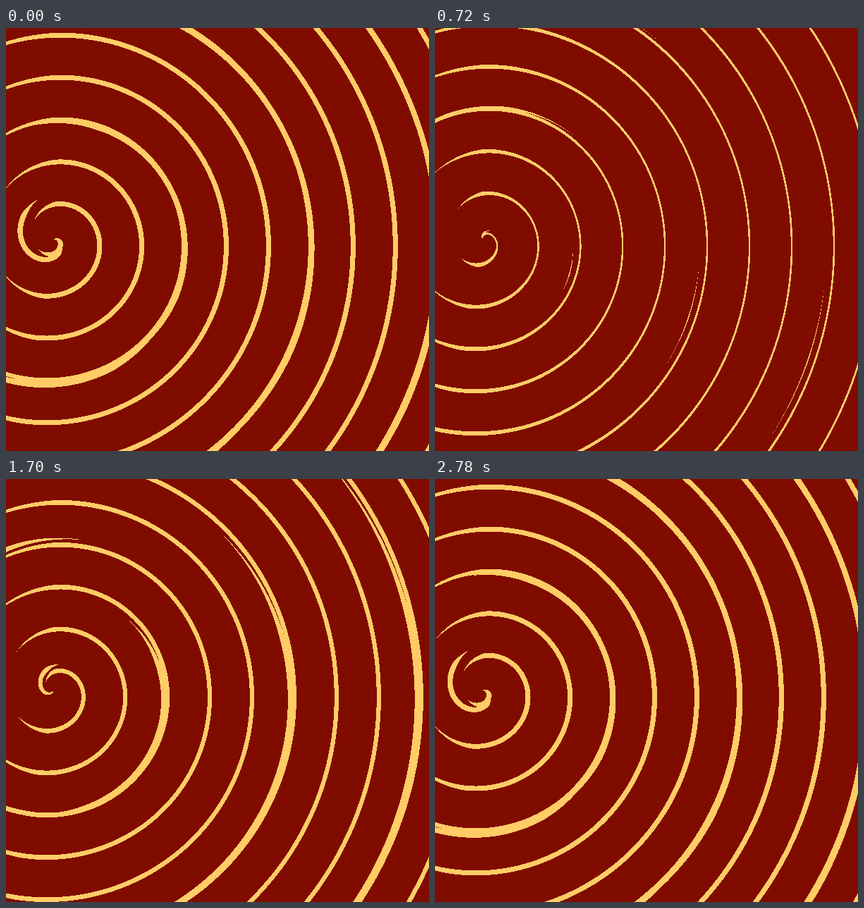
An HTML page for the animation above (2800 ms loop, 600x600 px).

```html
<!DOCTYPE html>
<html lang="en">
<head>
<meta charset="utf-8">
<title>Turning spiral</title>
<style>
  html, body { margin: 0; width: 100%; height: 100%; overflow: hidden; background: #800c00; }
  svg { display: block; width: 600px; height: 600px; }
</style>
</head>
<body>
<svg viewBox="0 0 600 600">
  <path id="ink" fill="#ffcc66" shape-rendering="crispEdges"/>
</svg>
<script>
const ink = document.getElementById('ink');
const CX = 67.5, CY = 300, PITCH = 60, STEPS = 60;

const cos = deg => Math.cos(deg * Math.PI / 180);
const sin = deg => Math.sin(deg * Math.PI / 180);

// Outlines the band between the two radii that edges(angle) returns.
function ribbon(from, to, turn, edges) {
  const outer = [], inner = [];
  for (let deg = from; deg <= to; deg += 2) {
    const [lo, hi] = edges(deg);
    if (hi <= 0) continue;
    const point = r => (CX + r * cos(deg - turn)).toFixed(2) + ' ' + (CY + r * sin(deg - turn)).toFixed(2);
    inner.push(point(Math.max(0, lo)));
    outer.push(point(hi));
  }
  return outer.length ? 'M' + outer.concat(inner.reverse()).join('L') + 'Z' : '';
}

// The pen swells twice per loop, with a slower drift on top.
const penWidth = step => 5.3 + 1.8 * cos(12 * step) - sin(6 * step);

// Even spiral, thinning out towards the left.
function line(step) {
  const pen = penWidth(step);
  const ends = 6.5 + 0.25 * (pen - 5.3);
  return ribbon(-6 * (61 + step), 3600, 0, deg => {
    const angle = ((deg % 360) + 360) % 360;
    const thin = Math.max(0, 85 - Math.abs(angle - 186)) * 0.15;
    const width = Math.max(0, ends + (pen - ends) * Math.max(0, cos(angle)) - thin);
    const inner = 61.2 + step + deg * PITCH / 360;
    return [inner, inner + width];
  });
}

// Wider spiral that crosses every third turn of the line and turns with it.
function strand(step, start, end) {
  const width = penWidth(step) + 0.7;
  let outline = '';
  for (let shift = -180; shift <= 540; shift += 180) {
    outline += ribbon(start, end, 6 * step, deg => {
      const middle = 125 + deg / 6 + 0.054 * (deg - 342) + shift;
      const fade = Math.min(1, (deg - start) / 30, (end - deg) / 30);
      return [middle - width / 2 * fade, middle + width / 2 * fade];
    });
  }
  return outline;
}

// Two pieces of the strand slide along it, meet and part again.
function strands(step) {
  const phase = (step + 44) % STEPS;
  const reach = 110 * sin(3 * phase);
  const start = 103 + 3.6 * phase, end = 131 + 4.6 * phase;
  return strand(step, start, end + reach) + strand(step, start + 216 - reach, end + 276);
}

// Three steps take 140 ms: 20, 100 and 20.
function stepAt(ms) {
  const t = ms % 2800, part = t % 140;
  return Math.floor(t / 140) * 3 + (part < 20 ? 0 : part < 120 ? 1 : 2);
}

let shown = -1;
function play() {
  const step = stepAt(performance.now());
  if (step !== shown) {
    shown = step;
    ink.setAttribute('d', line(step) + strands(step));
  }
  requestAnimationFrame(play);
}
play();
</script>
</body>
</html>
```
